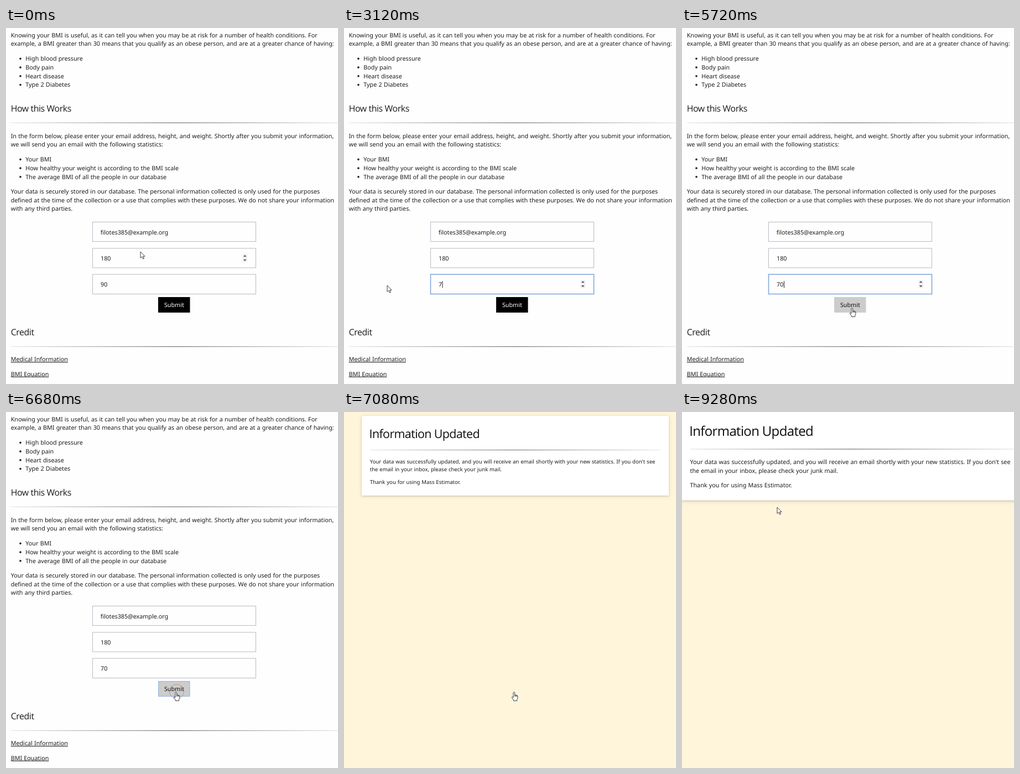
These frames come from a looping animation (600x643 px, 9320 ms). An HTML page:

```html
<!DOCTYPE html>
<html lang="en">
<head>
<meta charset="utf-8">
<title>BMI form</title>
<style>
  html, body { margin: 0; width: 100%; height: 100%; overflow: hidden; background: #fefefe; }
  svg { display: block; }
  text {
    font: 10.75px "Noto Sans", "Open Sans", sans-serif;
    word-spacing: .42px; fill: #1b1b1b; white-space: pre;
    text-rendering: geometricPrecision;
  }
  .h3 { font: 15.9px "Open Sans", "Noto Sans", sans-serif; letter-spacing: -.42px; word-spacing: 0; }
  .h2 { font: 24px "Open Sans", "Noto Sans", sans-serif; letter-spacing: -.66px; word-spacing: 0; fill: #0c0c0c; }
  .link { text-decoration: underline; }
  .field { fill: #fefefe; stroke: #b9bac3; }
  .field.focus { stroke: #84a8dc; stroke-width: 1.6; }
  #card { transform-origin: 309.5px 81px; }
  #sheet { fill: #fff; filter: drop-shadow(0 1.5px 2px rgba(0,0,0,.16)) drop-shadow(0 1.5px 4px rgba(0,0,0,.1)); }
  .cursor { fill: #fff; stroke: #33343a; stroke-width: .95; stroke-linejoin: round; }
</style>
</head>
<body>
<svg width="600" height="643" viewBox="0 0 600 643">
  <defs>
    <linearGradient id="fade" gradientUnits="userSpaceOnUse" x1="9" x2="606">
      <stop offset="0" stop-color="#223" stop-opacity=".1"/>
      <stop offset=".5" stop-color="#223" stop-opacity=".6"/>
      <stop offset="1" stop-color="#223" stop-opacity=".1"/>
    </linearGradient>
    <g id="spin">
      <rect x="-4" y="-7.5" width="8.5" height="15" fill="#f0f0f0"/>
      <path d="M-2.6 -2.6L.2 -5.6 3 -2.6ZM-2.6 2.6L.2 5.6 3 2.6Z" fill="#4c4c4c"/>
    </g>
  </defs>

  <g id="form">
    <rect width="600" height="643" fill="#fefefe"/>
    <g id="copy"></g>
    <rect class="field" x="156.5" y="350.5" width="295" height="35"/>
    <rect class="field" x="156.5" y="398" width="295" height="35"/>
    <rect class="field" id="weight" x="156.5" y="445" width="295" height="35.5"/>
    <text x="170.8" y="372.5">filotes385@example.org</text>
    <text x="171" y="419.7">180</text>
    <rect id="mark" y="456.5" height="13" fill="#2f7fdb"/>
    <text y="467" x="171"><tspan id="d1"></tspan><tspan id="d2"></tspan></text>
    <rect id="caret" y="457" width="1" height="12.5" fill="#222"/>
    <use id="spin2" href="#spin" x="431.5" y="415.5"/>
    <use id="spin3" href="#spin" x="431.5" y="462.5"/>
    <rect id="button" x="275.5" y="486.5" width="56.5" height="27"/>
    <text id="submit" x="303.9" y="504" text-anchor="middle">Submit</text>
  </g>

  <g id="done">
    <rect width="600" height="643" fill="#fef5db"/>
    <g id="card">
      <rect id="sheet" x="-2" y="-2" width="623" height="161.5"/>
    </g>
  </g>

  <circle id="ring" fill="none"/>
  <path class="cursor" id="arrow" d="M0 0V11.4L2.7 9 4.5 13.2 6.4 12.4 4.7 8.4H8Z"/>
  <path class="cursor" id="hand" d="M-1.3 .6Q0 -1 1.3 .6V5.2L3.2 5.1 5 5.7 6.6 6.7V10.8L5.3 13.2V15.6H-.9V14L-4 9.8Q-3.9 7.8 -2.4 8.7L-1.3 9.8ZM1.3 5.2V8M3.2 5.2V8M5 5.8V8.3"/>
  <path id="ibeam" d="M-2.5 -5.5H-.6L0 -5 .6 -5.5H2.5M0 -5V5M-2.5 5.5H-.6L0 5 .6 5.5H2.5" fill="none" stroke="#222"/>
</svg>

<script>
const LOOP = 9320, PRESS = 1860, KEY1 = 3080, KEY2 = 3480, CLICK = 6580, LOADED = 6716;
const $ = id => document.getElementById(id);
const set = (el, attrs) => { for (const k in attrs) el.setAttribute(k, attrs[k]); };
const show = (el, on) => { el.style.display = on ? '' : 'none'; };

function add(parent, tag, attrs, text = '') {
  const el = document.createElementNS('http://www.w3.org/2000/svg', tag);
  set(el, attrs);
  el.textContent = text;
  parent.append(el);
}
const line = (parent, x, y, text, cls = '') => add(parent, 'text', { x, y, class: cls }, text);
const rule = (parent, x, y, width) => add(parent, 'rect', { x, y, width, height: 1.3, fill: 'url(#fade)' });

const copy = $('copy'), card = $('card');

[[16.5, 'Knowing your BMI is useful, as it can tell you when you may be at risk for a number of health conditions. For'],
 [32, 'example, a BMI greater than 30 means that you qualify as an obese person, and are at a greater chance of having:'],
 [198.5, 'In the form below, please enter your email address, height, and weight. Shortly after you submit your information,'],
 [214.2, 'we will send you an email with the following statistics:'],
 [299, 'Your data is securely stored in our database. The personal information collected is only used for the purposes'],
 [314.5, 'defined at the time of the collection or a use that complies with these purposes. We do not share your information'],
 [330.2, 'with any third parties.'],
 [151, 'How this Works', 'h3'],
 [555, 'Credit', 'h3'],
 [602, 'Medical Information', 'link'],
 [628.7, 'BMI Equation', 'link']
].forEach(([y, text, cls]) => line(copy, 8.7, y, text, cls));

function list(top, items) {
  items.forEach((text, i) => {
    const y = top + i * 15.75;
    add(copy, 'circle', { cx: 26, cy: y - 3.6, r: 1.8, fill: '#222' });
    line(copy, 35.3, y, text);
  });
}
list(59, ['High blood pressure', 'Body pain', 'Heart disease', 'Type 2 Diabetes']);
list(241, ['Your BMI', 'How healthy your weight is according to the BMI scale', 'The average BMI of all the people in our database']);
rule(copy, 9, 170.6, 590);
rule(copy, 9, 574.8, 590);

line(card, 13.2, 43.3, 'Information Updated', 'h2');
rule(card, 14.5, 66.4, 590);
line(card, 14.5, 94, "Your data was successfully updated, and you will receive an email shortly with your new statistics. If you don't see");
line(card, 14.5, 109.7, 'the email in your inbox, please check your junk mail.');
line(card, 14.5, 136, 'Thank you for using Mass Estimator.');

const zoom = card.animate(
  [{ transform: 'scale(0)' }, { transform: 'scale(1)' }],
  { duration: 600, easing: 'ease', fill: 'both' });
zoom.pause();

// time, x, y of the pointer
const path = [
  [0, 243, 404], [960, 243, 404], [1120, 238, 432], [1280, 222, 462], [1400, 214, 470],
  [1700, 214, 470], [1840, 211, 471], [1880, 180.5, 471], [1960, 135, 470], [2120, 92, 467],
  [2400, 78, 465], [4000, 78, 465], [4200, 86, 490], [4600, 148, 522], [4760, 166, 519],
  [5000, 190, 517], [5160, 270, 510], [5280, 307.3, 506], [7200, 307.3, 506], [7500, 238, 366],
  [7800, 193, 235], [8080, 176, 186], [8320, 172, 172], [LOOP, 172, 172]
];

function pointer(t) {
  const i = path.findIndex(p => p[0] > t);
  const [t0, x0, y0] = path[i - 1], [t1, x1, y1] = path[i];
  const k = (t - t0) / (t1 - t0);
  return [x0 + (x1 - x0) * k, y0 + (y1 - y0) * k];
}

function drawRing(t) {
  const second = t >= CLICK;
  const age = t - (second ? CLICK : PRESS);
  const on = age >= 0 && age < 180;
  show($('ring'), on);
  if (!on) return;
  set($('ring'), {
    cx: second ? 308.5 : 211, cy: second ? 505 : 471,
    r: 2 + 11 * Math.min(1, age / 100),
    stroke: age < 120 ? 'rgba(205,95,85,.55)' : 'rgba(120,112,115,.6)'
  });
}

function drawCursor(t, x, y) {
  const kind = t < 1000 ? 'arrow' : t < 2640 ? 'ibeam' : t < 5180 ? 'arrow' : t <= 7200 ? 'hand' : 'arrow';
  for (const id of ['arrow', 'ibeam', 'hand']) show($(id), id === kind);
  set($(kind), { transform: `translate(${x} ${y})` });
}

function drawForm(t, x, y) {
  const focus = t >= PRESS && t < CLICK, typed = t >= KEY1;
  set($('weight'), { class: focus ? 'field focus' : 'field' });
  show($('spin2'), t < PRESS && y < 433);
  show($('spin3'), focus || (t < PRESS && y >= 445));

  const selecting = t >= PRESS && !typed;
  const all = selecting && (t > 2000 || x < 174), zero = selecting && (all || x < 184);
  const start = all ? 171 : 177.2;
  show($('mark'), zero);
  set($('mark'), { x: start, width: 184 - start });
  $('d1').textContent = typed ? '7' : '9';
  $('d2').textContent = typed && t < KEY2 ? '' : '0';
  $('d1').style.fill = all ? '#fff' : '';
  $('d2').style.fill = zero ? '#fff' : '';

  const lit = t < KEY2 || Math.floor((t - KEY2) / 530) % 2 === 0;
  show($('caret'), focus && typed && lit);
  set($('caret'), { x: t < KEY2 ? 177.5 : 184 });

  const hover = t >= 5180, pressed = t >= CLICK;
  set($('button'), { fill: hover ? '#ccc' : '#000', stroke: pressed ? '#8fb0e0' : hover ? '#ccc' : '#000' });
  $('submit').style.fill = hover ? '#111' : '#fff';
}

function render(t) {
  const [x, y] = pointer(t), loaded = t >= LOADED;
  show($('form'), !loaded);
  show($('done'), loaded);
  if (loaded) zoom.currentTime = Math.min(600, t - LOADED);
  else drawForm(t, x, y);
  drawRing(t);
  drawCursor(t, x, y);
}

function tick() {
  render(performance.now() % LOOP);
  requestAnimationFrame(tick);
}
tick();
</script>
</body>
</html>
```
